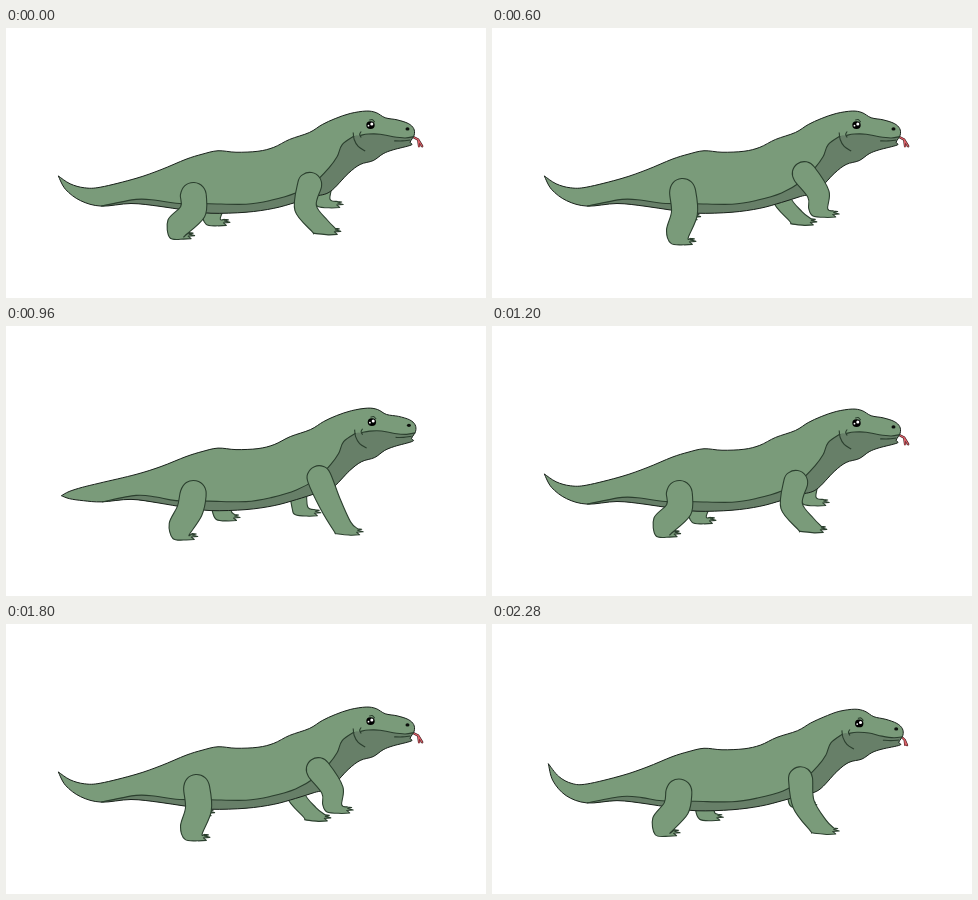
Write an HTML page with a canvas that moves like this. It is 480 by 270 pixels and loops after 2400 ms.

```html
<!DOCTYPE html>
<html lang="en">
<head>
<meta charset="utf-8">
<title>Walking lizard</title>
<style>
html, body { margin: 0; width: 100%; height: 100%; overflow: hidden; background: #fff; }
canvas { display: block; }
</style>
</head>
<body>
<canvas id="stage" width="480" height="270"></canvas>
<script>
const c = document.getElementById('stage').getContext('2d');
const SKIN = '#7a9b7a', BELLY = '#677f68', EDGE = '#18201a', LINE = '#2b3f2e';
const STEP = 120, STRIDE = 10, NOD = 5; // a stride is ten poses, a nod of the head five

const clamp = v => Math.max(0, Math.min(1, v));
const wave = (k, peak, period = STRIDE) => Math.cos((k - peak) / period * 2 * Math.PI);
const pairs = a => a.reduce((r, v, i) => (i % 2 ? r[r.length - 1].push(v) : r.push([v]), r), []);

// Every joint coordinate swings as: mean, amplitude, peak (and a faster amplitude, peak)
const FRONT = {
  hip: [[308, 8, 6.6], [151, -5.5, 5.3]],
  knee: [[313, 21, 6.4], [173, 7.5, 9.4]],
  ankle: [[320, 20, 7], [192, 9, 9.6, 3.5, 8]],
  toe: [18.5, 5.5], widths: [12, 11, 9.5], far: [-10, -9.5]
};
const BACK = {
  hip: [[189, 2, 4], [165.5, -2.5, 4]],
  knee: [[189.5, 6, 3.3], [184.5, 1, 6]],
  ankle: [[181, 12, 3.6, 3.5, 2.8], [203, 3, 5.5]],
  toe: [16, 7.5], widths: [13, 13, 11.5], far: [20, -19]
};

// Body outline and markings at rest
const back = pairs([130,149, 155,141, 180,131, 196,126, 212,122.5, 230,124, 252,123, 268,119, 284,111,
  304,104, 317,96, 330,90, 345,85, 361,82.5, 371,84, 380,89, 392,91, 403,94.5, 408.5,99.5]);
const under = pairs([409,106, 405,113, 406,116, 388,121, 378,125, 368,132, 355,136, 343,145,
  325,163, 309,168, 290,174, 268,180, 240,184, 205,185, 180,182, 153,177.5, 125,174]);
const flank = pairs([130,170, 150,171.5, 170,175, 203,175.5, 240,176, 265,172, 290,164.5, 310,153,
  324,139, 332,128, 337,116, 349,107.5]);
const mouth = pairs([355,107, 363,105.5, 375,105.5, 388,108, 400,109, 409,107.5]);
const creases = [[348,104, 349,111, 353,118, 360,122.5], [356,103, 354.5,106, 356,109],
  [389,112, 397,112, 405,111], [364,91.5, 367,91, 369.5,93.5]].map(pairs);

function getPose(k) {
  const bob = wave(k, 1.6, NOD), headY = -1.2 - 4.2 * bob;
  const tip = [51 - 4 * wave(k, 2.5) - 3 * bob, 164 + 30 * wave(k, 1.7, NOD) + 8 * wave(k, 7.5)];
  return {
    k, tip, headY,
    headX: -1 - 3 * wave(k, 1.3, NOD),
    bodyY: -.9 - 2.7 * bob,
    arch: (164 - tip[1]) * .1
  };
}

// Moves resting points with the head, the body and the root of the tail
const warp = (points, p) => points.map(([x, y]) => {
  const head = clamp((x - 250) / 70), body = clamp((x - 110) / 60);
  return [x + p.headX * head,
    y + body * (p.bodyY + (p.headY - p.bodyY) * head) + p.arch * clamp((170 - x) / 50)
      + .018 * p.headY * (x - 366) * clamp((x - 335) / 20)];
});

// Offsets a bent spine to both sides; the upper side runs from the tip
function getTail({ tip, arch }) {
  const root = [95, 167 + arch], bend = [66, 169], upper = [], lower = [];
  for (const t of [0, .35, .7]) {
    const u = 1 - t, w = 9.5 * u ** .8;
    const at = i => u * u * root[i] + 2 * u * t * bend[i] + t * t * tip[i];
    const slope = i => u * (bend[i] - root[i]) + t * (tip[i] - bend[i]);
    const l = Math.hypot(slope(0), slope(1)), nx = -slope(1) / l * w, ny = slope(0) / l * w;
    upper.unshift([at(0) + nx, at(1) + ny]);
    lower.push([at(0) - nx, at(1) - ny]);
  }
  return { upper, lower };
}

// Smooth curve through points, joined on to the given path
function curve(path, p) {
  path.lineTo(...p[0]);
  for (let i = 0; i < p.length - 1; i++) {
    const a = p[i - 1] || p[i], b = p[i], d = p[i + 1], e = p[i + 2] || d;
    path.bezierCurveTo(b[0] + (d[0] - a[0]) / 6, b[1] + (d[1] - a[1]) / 6,
      d[0] - (e[0] - b[0]) / 6, d[1] - (e[1] - b[1]) / 6, ...d);
  }
  return path;
}

function stroke(path, color = LINE, width = 1.1) {
  c.strokeStyle = color;
  c.lineWidth = width;
  c.stroke(path);
}

function fill(path, color) {
  c.fillStyle = color;
  c.fill(path);
}

function dot([x, y], rx, ry, color) {
  const path = new Path2D();
  path.ellipse(x, y, rx, ry, 0, 0, 7);
  fill(path, color);
}

function unit(a, b) {
  const x = b[0] - a[0], y = b[1] - a[1], l = Math.hypot(x, y);
  return [x / l, y / l];
}

function drawLeg(gait, k, isFar) {
  const phase = isFar ? k + STRIDE / 2 : k, [w1, w2, w3] = gait.widths.map(w => isFar ? w * .82 : w);
  const joint = name => gait[name].map(([mean, amp, peak, amp2 = 0, peak2 = 0], i) =>
    mean + amp * wave(phase, peak) + amp2 * wave(phase, peak2, STRIDE / 2) + (isFar ? gait.far[i] : 0));
  const hip = joint('hip'), knee = joint('knee'), ankle = joint('ankle');
  const tx = ankle[0] + gait.toe[0], ty = ankle[1] + gait.toe[1];
  const thigh = unit(hip, knee), shin = unit(knee, ankle);
  const mid = unit([0, 0], [thigh[0] + shin[0], thigh[1] + shin[1]]);
  const off = (p, u, side, along = 0) => [p[0] - u[1] * side + u[0] * along, p[1] + u[0] * side + u[1] * along];
  const q = w1 * Math.SQRT1_2;
  const path = curve(new Path2D(), [
    [tx - 3, ty - 3], off(ankle, shin, -w3), off(knee, mid, -w2), off(hip, thigh, -w1),
    off(hip, thigh, -q, -q), off(hip, thigh, 0, -w1), off(hip, thigh, q, -q),
    off(hip, thigh, w1), off(knee, mid, w2), off(ankle, shin, w3),
    [ankle[0] - w3 * .55, ty + 2], [tx - 9, ty + 3.5]]);
  for (const [x, y] of [[-1, 3], [-4, .5], [2.5, 0], [-3, -1.5], [1, -2.5]]) path.lineTo(tx + x, ty + y);
  path.closePath();
  fill(path, SKIN);
  stroke(path);
}

function drawBody(p) {
  const { upper, lower } = getTail(p);
  const outline = curve(new Path2D(),
    [p.tip, ...upper, ...warp(back, p), ...warp(under, p), ...lower, p.tip]);
  const line = [lower[0], ...warp(flank, p)], lips = warp(mouth, p);
  const shade = curve(new Path2D(), [...line, ...lips]);
  shade.lineTo(430, 108);
  shade.lineTo(430, 230);
  shade.lineTo(lower[0][0], 230);
  fill(outline, SKIN);
  c.save();
  c.clip(outline);
  fill(shade, BELLY);
  c.restore();
  stroke(outline, EDGE, 1);
  for (const l of [line, lips, ...creases.map(s => warp(s, p))]) stroke(curve(new Path2D(), l));
}

function drawEye(p) {
  const [eye, nostril] = warp([[365.3, 96.5], [402.3, 100]], p);
  dot(eye, 4.2, 3.9, '#000');
  dot([eye[0] + 1.3, eye[1] - 1], 1.5, 1.5, '#fff');
  dot([eye[0] - 2, eye[1] + .6], .9, .9, '#fff');
  dot(nostril, 2, 1.6, '#0c100c');
}

function drawTongue(p) {
  const reach = clamp(.7 + .7 * wave(p.k, .4, NOD));
  if (reach < .1) return;
  const [[x, y]] = warp([[408, 108]], p), drop = 8 + 2 * p.headY;
  const path = new Path2D();
  const to = (dx, dy) => path.lineTo(x + dx * reach, y + dy * reach);
  to(0, 0);
  to(5, drop / 2 - 2);
  to(9, drop);
  to(5, drop / 2 - 2);
  to(6, drop + 1);
  stroke(path, '#3a1a1c', 2.3);
  stroke(path, '#dc6068', 1.2);
}

function draw(time) {
  const k = Math.floor(time / STEP) % STRIDE, p = getPose(k);
  c.clearRect(0, 0, 480, 270);
  c.lineJoin = 'round';
  drawLeg(BACK, k, true);
  drawLeg(FRONT, k, true);
  drawTongue(p);
  drawBody(p);
  drawEye(p);
  drawLeg(BACK, k, false);
  drawLeg(FRONT, k, false);
}

const start = performance.now();
function tick() {
  draw(performance.now() - start);
  requestAnimationFrame(tick);
}
tick();
</script>
</body>
</html>
```
